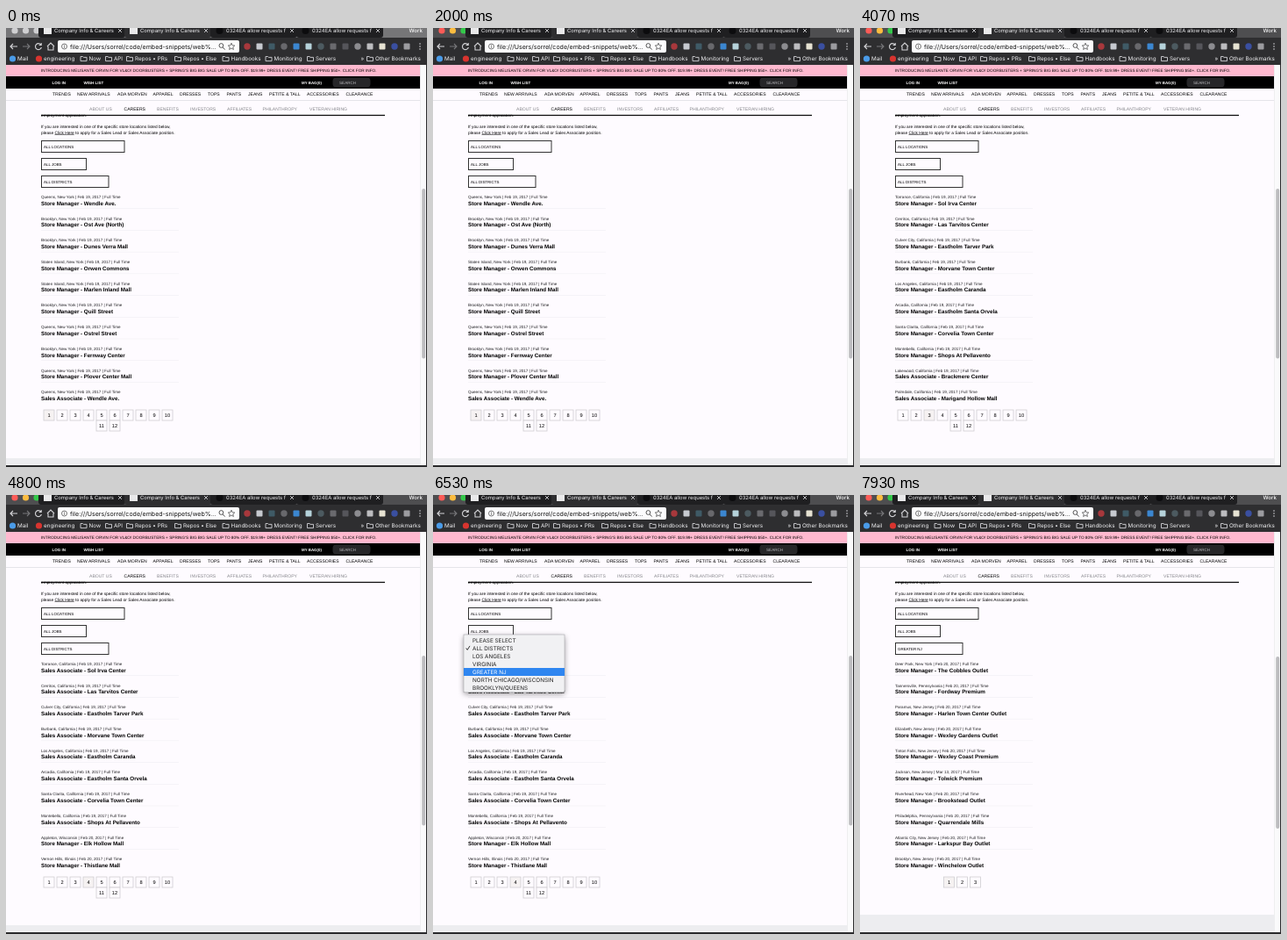
Animation, 480 px wide and 500 px high, one loop 8000 ms. Source, as an HTML page with a canvas:

```html
<!DOCTYPE html>
<html lang="en">
<head>
<meta charset="utf-8">
<title>Store openings</title>
<style>
  html, body { margin: 0; width: 100%; height: 100%; overflow: hidden; background: #fefbff; }
  canvas { display: block; width: 480px; height: 500px; }
</style>
</head>
<body>
<canvas id="stage"></canvas>
<script>
const LOOP = 8000, W = 480, H = 500;
const PAGE = '"Liberation Sans", Arial, sans-serif';
const UI = 'Inter, Roboto, sans-serif';
const PAPER = '#fefbff', BAR = '#2e2e30', PALE = '#f2f2f4';
const canvas = document.getElementById('stage');
const ctx = canvas.getContext('2d');
const dpr = window.devicePixelRatio || 1;
canvas.width = W * dpr;
canvas.height = H * dpr;

// Listings: "city|store", expanded into rows per job
const jobs = (job, state, date, list) => list.map(s => {
  const [city, store] = s.split('|');
  return { meta: `${city}, ${state} | ${date}, 2017 | Full Time`, title: `${job} - ${store}` };
});
const MANAGER = 'Store Manager', ASSOCIATE = 'Sales Associate';
const newYork = ['Queens|Wendle Ave.', 'Brooklyn|Ost Ave (North)', 'Brooklyn|Dunes Verra Mall',
  'Staten Island|Orwen Commons', 'Staten Island|Marlen Inland Mall', 'Brooklyn|Quill Street',
  'Queens|Ostrel Street', 'Brooklyn|Fernway Center', 'Queens|Plover Center Mall'];
const california = ['Lakewood|Brackmere Center', 'Palmdale|Marigand Hollow Mall', 'Torrance|Sol Irva Center',
  'Cerritos|Las Tarvitos Center', 'Culver City|Eastholm Tarver Park', 'Burbank|Morvane Town Center',
  'Los Angeles|Eastholm Caranda', 'Arcadia|Eastholm Santa Orvela', 'Santa Clarita|Corvelia Town Center',
  'Montebello|Shops At Pellavento'];
const allRows = [
  ...jobs(MANAGER, 'New York', 'Feb 19', newYork),
  ...jobs(ASSOCIATE, 'New York', 'Feb 19', newYork),
  ...jobs(MANAGER, 'California', 'Feb 19', california),
  ...jobs(ASSOCIATE, 'California', 'Feb 19', california),
  ...jobs(MANAGER, 'Wisconsin', 'Feb 20', ['Appleton|Elk Hollow Mall']),
  ...jobs(MANAGER, 'Illinois', 'Feb 20', ['Vernon Hills|Thistlane Mall'])
];
const districtRows = [
  ...jobs(MANAGER, 'New York', 'Feb 20', ['Deer Park|The Cobbles Outlet']),
  ...jobs(MANAGER, 'Pennsylvania', 'Feb 20', ['Tannersville|Fordway Premium']),
  ...jobs(MANAGER, 'New Jersey', 'Feb 20', ['Paramus|Harlen Town Center Outlet',
    'Elizabeth|Wexley Gardens Outlet', 'Tinton Falls|Wexley Coast Premium']),
  ...jobs(MANAGER, 'New Jersey', 'Mar 13', ['Jackson|Tolwick Premium']),
  ...jobs(MANAGER, 'New York', 'Feb 20', ['Riverhead|Brookstead Outlet']),
  ...jobs(MANAGER, 'Pennsylvania', 'Feb 20', ['Philadelphia|Quarrendale Mills']),
  ...jobs(MANAGER, 'New Jersey', 'Feb 20', ['Atlantic City|Larkspur Bay Outlet', 'Brooklyn|Winchelow Outlet'])
];
const districts = ['PLEASE SELECT', 'ALL DISTRICTS', 'LOS ANGELES', 'VIRGINIA', 'GREATER NJ',
  'NORTH CHICAGO/WISCONSIN', 'BROOKLYN/QUEENS'];

// Drawing helpers
function text(s, x, y, size, color = '#000', font = PAGE, weight = 400) {
  ctx.font = `${weight} ${size}px ${font}`;
  ctx.fillStyle = color;
  ctx.fillText(s, x, y);
}
function rect(x, y, w, h, color) {
  ctx.fillStyle = color;
  ctx.fillRect(x, y, w, h);
}
function frame(x, y, w, h, color, width = 1) {
  ctx.strokeStyle = color;
  ctx.lineWidth = width;
  ctx.strokeRect(x, y, w, h);
}
function pill(x, y, w, h, r, color) {
  ctx.beginPath();
  ctx.roundRect(x, y, w, h, r);
  ctx.fillStyle = color;
  ctx.fill();
}
function dot(x, y, r, color) {
  ctx.beginPath();
  ctx.arc(x, y, r, 0, Math.PI * 2);
  ctx.fillStyle = color;
  ctx.fill();
}
function stroke(d, x, y, color, width = 1) {
  ctx.save();
  ctx.translate(x, y);
  ctx.strokeStyle = color;
  ctx.lineWidth = width;
  ctx.stroke(new Path2D(d));
  ctx.restore();
}
function clipped(x, y, w, h, draw) {
  ctx.save();
  ctx.beginPath();
  ctx.rect(x, y, w, h);
  ctx.clip();
  draw();
  ctx.restore();
}

function tab(i, title, drawIcon) {
  const x = 43 + i * 98;
  pill(x - 6, -4, 99, 15, 3, i === 1 ? BAR : '#1f1f21');
  drawIcon(x + 4.5);
  clipped(x + 12, 0, 68, 12, () => text(title, x + 12, 5.4, 5.9, PALE, UI));
  stroke('M-2 -2L2 2M2 -2L-2 2', x + 87, 3, '#c9c9cc', 0.9);
}

function label(s, x) {
  text(s, x, 37.2, 6.3, PALE, UI);
}
function folder(x, name) {
  stroke('M-3.5 -2.5H-1L0 -1.6H3.5V2.6H-3.5Z', x, 35, '#d2d2d6', 0.9);
  label(name, x + 6);
}

function browser(focused) {
  rect(0, 0, W, 11, focused ? '#4e4e50' : '#767678');
  rect(0, 11, W, 31, BAR);
  const lights = focused ? ['#fc5b57', '#fdbc40', '#34c84a'] : Array(3).fill('#cfcfd1');
  lights.forEach((c, i) => dot(10 + i * 12.5, 3, 3.6, c));
  const square = x => rect(x - 4.5, -1, 9, 8, '#e9e9ea');
  const disc = x => dot(x, 3, 4, '#0c0c0e');
  tab(0, 'Company Info & Careers', square);
  tab(1, 'Company Info & Careers', square);
  tab(2, '0324EA allow requests f', disc);
  tab(3, '0324EA allow requests f', disc);
  text('Work', 459.5, 5.4, 6.1, '#fff', UI, 500);

  stroke('M4 0H-4M-1 -3L-4 0L-1 3', 9, 21, '#d4d4d7', 1.1);
  stroke('M-4 0H4M1 -3L4 0L1 3', 23, 21, '#77777a', 1.1);
  stroke('M2.8 -2A3.5 3.5 0 1 0 3.4 1M3.2 -4V-1.5H.7', 37, 21, '#d4d4d7', 1.1);
  stroke('M-4 0L0 -4L4 0M-3 0V4H3V0', 51, 21, '#d4d4d7', 1.1);

  pill(59, 14, 207, 14, 2, '#fcfcfd');
  stroke('M3 0A3 3 0 1 1 -3 0A3 3 0 1 1 3 0M0 -.5V1.7M0 -1.8V-1', 66.5, 21, '#555', 0.8);
  text('file:///Users/sorrel/code/embed-snippets/web%...', 73, 23.6, 7.05, '#111', UI);
  stroke('M1.8 -1A2.4 2.4 0 1 1 -3 -1A2.4 2.4 0 1 1 1.8 -1M1.2 1L3.6 3.6', 246, 21, '#555', 1);
  stroke('M0 -3.8L1.1 -1.2L3.8 -1L1.8 .8L2.4 3.5L0 2L-2.4 3.5L-1.8 .8L-3.8 -1L-1.1 -1.2Z', 257, 21, '#555', 0.8);

  ['#a8383c', '#c6c9cf', '#3f5a66', '#68686c', '#3b86d0', '#b5d2da', '#4c5a60', '#6a6a6e',
    '#55555a', '#8c8c90', '#bcbcbf', '#e6e2d2', '#3a4fa0', '#9b9b9f'].forEach((c, i) => {
    const x = 275 + i * 14;
    if (i % 3) pill(x - 3.5, 17.5, 7, 7, 1, c);
    else dot(x, 21, 3.7, c);
  });
  [-3, 0, 3].forEach(d => dot(472, 21 + d, 0.8, '#d4d4d7'));

  dot(7.5, 35, 3.6, '#4a9be8');
  label('Mail', 13);
  dot(37.5, 35, 3.6, '#d8342f');
  label('engineering', 43);
  folder(88.5, 'Now');
  folder(117, 'API');
  folder(141, 'Repos • PRs');
  folder(196, 'Repos • Else');
  folder(250.5, 'Handbooks');
  folder(299.5, 'Monitoring');
  folder(347, 'Servers');
  label('»', 404.5);
  folder(415, 'Other Bookmarks');
}

function header() {
  rect(0, 42, 472, 13, '#ffb9cf');
  text("INTRODUCING MELISANTE ORVIN FOR VL&O! DOORBUSTERS + SPRING'S BIG BIG SALE UP TO 80% OFF. " +
    '$19.99+ DRESS EVENT! FREE SHIPPING $50+. CLICK FOR INFO.', 40, 50.4, 4.69);
  rect(0, 55, 472, 14, '#000');
  text('LOG IN', 52.5, 63.8, 4.5, '#fff', PAGE, 700);
  text('WISH LIST', 88.5, 63.8, 4.5, '#fff', PAGE, 700);
  text('MY BAG(0)', 337, 63.8, 4.4, '#fff', PAGE, 700);
  pill(372.5, 56.5, 43, 11, 4, '#262628');
  text('SEARCH', 380, 63.8, 4.6, '#b9b9bc');

  [['TRENDS', 53], ['NEW ARRIVALS', 81], ['ADA MORVEN', 127], ['APPAREL', 167.5], ['DRESSES', 198],
    ['TOPS', 230], ['PANTS', 251.5], ['JEANS', 276], ['PETITE & TALL', 300], ['ACCESSORIES', 343],
    ['CLEARANCE', 387.5]].forEach(([s, x]) => text(s, x, 77.3, 5.07));
  rect(0, 82, 472, 0.7, '#dcdce0');
  [['ABOUT US', 95], ['CAREERS', 134.5], ['BENEFITS', 172], ['INVESTORS', 210], ['AFFILIATES', 252],
    ['PHILANTHROPY', 292.5], ['VETERAN HIRING', 346]].forEach(([s, x], i) =>
    text(s, x, 94, 5.07, i === 1 ? '#000' : '#85858a'));
  rect(40, 98.8, 392, 1.3, '#111');
  clipped(40, 98.5, 60, 6, () => text('employment application.', 40, 101, 4.82));
}

function select(name, y, w) {
  frame(40.5, y + 0.5, w - 1, 13, '#333');
  text(name, 43, y + 8.6, 4.45);
}

function intro(district) {
  text('If you are interested in one of the specific store locations listed below,', 40, 114, 4.82);
  text('please ', 40, 120.7, 4.82);
  const left = 40 + ctx.measureText('please ').width;
  const linkWidth = ctx.measureText('Click Here').width;
  text('Click Here to apply for a Sales Lead or Sales Associate position.', left, 120.7, 4.82);
  rect(left, 121.4, linkWidth, 0.5, '#000');
  select('ALL LOCATIONS', 128, 95.5);
  select('ALL JOBS', 148, 52);
  select(district, 168, 77.5);
}

function listing(rows) {
  rows.forEach((row, i) => {
    const y = i * 24.72;
    text(row.meta, 40, 193.8 + y, 4.57, '#1c1c1e');
    text(row.title, 40, 201.6 + y, 6.24, '#000', PAGE, 700);
    if (i < 9) rect(40, 205.4 + y, 157, 0.6, '#f0eef3');
  });
}

function pager(count, active) {
  ctx.textAlign = 'center';
  for (let n = 1; n <= count; n++) {
    const second = n > 10;
    const x = count < 10 ? 86.5 + n * 15 : second ? 109 + (n - 11) * 15 : 34 + n * 15;
    const y = second ? 453 : 441;
    rect(x - 6, y - 6, 12, 12, n === active ? '#f6f2f2' : PAPER);
    frame(x - 6, y - 6, 12, 12, '#cfcdd1', 0.8);
    text(n, x, y + 2, 5.7);
  }
  ctx.textAlign = 'left';
}

function menu(hover) {
  ctx.save();
  ctx.shadowColor = 'rgba(0,0,0,.4)';
  ctx.shadowBlur = 6 * dpr;
  ctx.shadowOffsetY = 2 * dpr;
  pill(35, 159, 115, 65.8, 2, '#f1f1f3');
  ctx.restore();
  frame(35, 159, 115, 65.8, '#aaaaae', 0.6);
  rect(35, 161 + hover * 9, 115, 9, '#2f86f0');
  districts.forEach((name, i) => text(name, 45, 167.7 + i * 9, 6.35, i === hover ? '#fff' : '#222', UI));
  stroke('M-2 0L-.6 2L2.2 -2.5', 39.8, 174.4, hover === 1 ? '#fff' : '#222', 0.9);
}

// Last step whose start time has passed
const at = (steps, t) => steps.reduce((v, [start, value]) => t >= start ? value : v, steps[0][1]);
const PAGES = [[0, 1], [2470, 2], [3600, 3], [4330, 4]];
const HOVERS = [[0, -1], [5270, 1], [5600, 2], [5930, 3], [6200, 4], [6670, -1]];
const FOCUSED = 1870, CHOSEN = 6670, FILTERED = 6930;

function draw(t) {
  const filtered = t >= FILTERED;
  const page = at(PAGES, t), hover = at(HOVERS, t);
  ctx.setTransform(dpr, 0, 0, dpr, 0, 0);
  ctx.textRendering = 'geometricPrecision';
  rect(0, 0, W, H, PAPER);
  browser(t >= FOCUSED);
  header();
  intro(t >= CHOSEN ? 'GREATER NJ' : 'ALL DISTRICTS');
  listing(filtered ? districtRows : allRows.slice(page * 10 - 10, page * 10));
  pager(filtered ? 3 : 12, filtered ? 1 : page);

  const footer = filtered ? 478 : 490;
  rect(0, footer, 472, 498 - footer, '#ededf0');
  rect(472, 42, 7, 456, '#fafafb');
  rect(472, 42, 0.6, 456, '#e6e6e9');
  pill(474.2, filtered ? 184 : 183, 4, filtered ? 196 : 193.5, 2, '#bdbdc0');
  rect(479, 42, 1, 458, '#2a2a2c');
  rect(0, 498, W, 2, '#2a2a2c');
  if (hover >= 0) menu(hover);
}

const start = performance.now();
function tick() {
  draw((performance.now() - start) % LOOP);
  requestAnimationFrame(tick);
}
tick();
</script>
</body>
</html>
```
